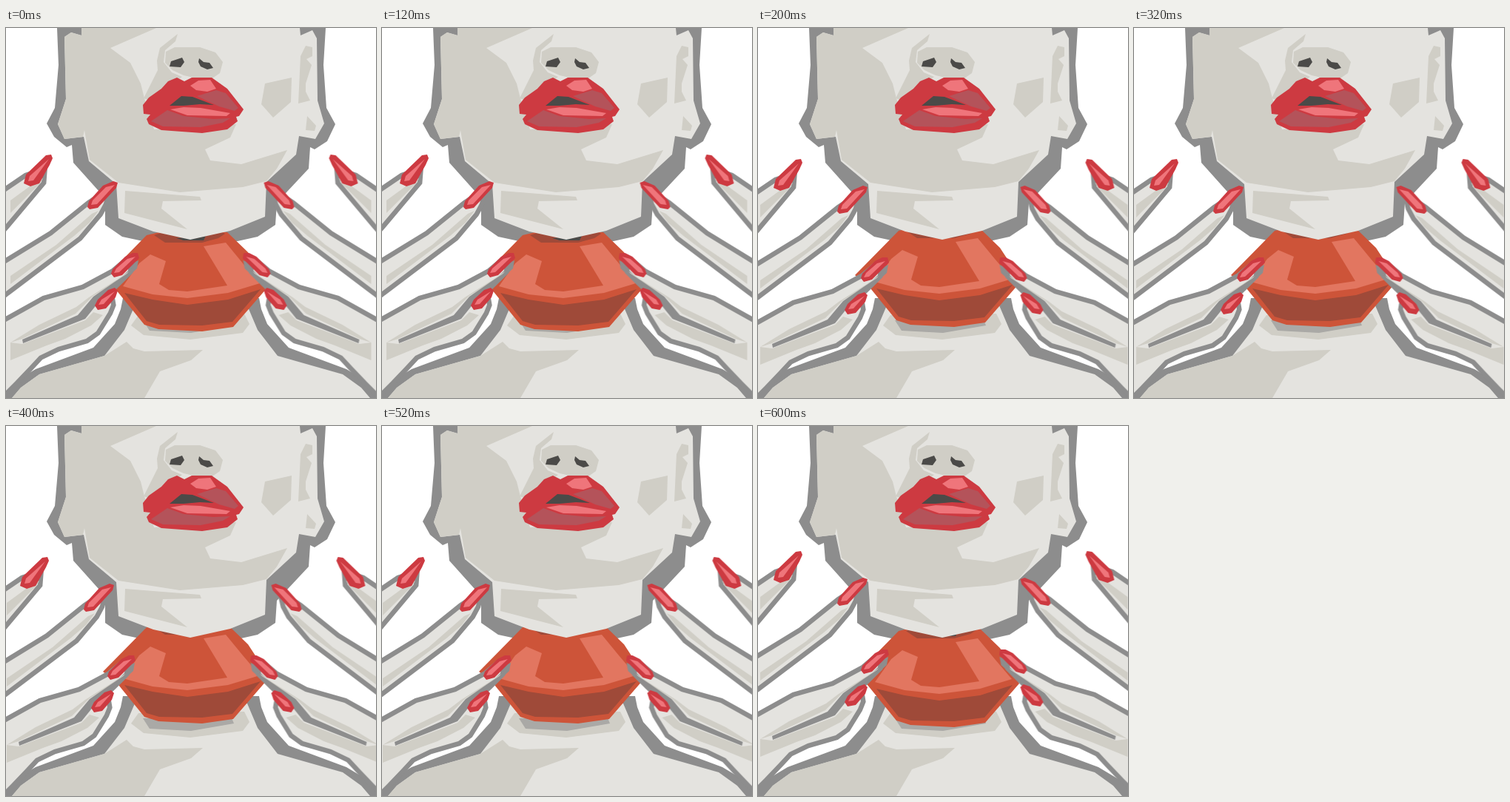
Write an HTML page that moves like this. It is 500 px wide and 500 px high and loops after 800 ms.

```html
<!DOCTYPE html>
<html lang="en">
<head>
<meta charset="utf-8">
<title>Face and hands</title>
<style>
  html, body { margin: 0; width: 100%; height: 100%; overflow: hidden; background: #fff; }
  svg { display: block; width: 100vw; height: 100vh; }
  .line { fill: #8d8d8d; }
  .skin { fill: #e4e3df; }
  .shade { fill: #d0cec6; }
  .dark { fill: #4b4a48; }
  .red { fill: #cd3a41; }
  .pink { fill: #ef757b; }
  .wine { fill: #b4535a; }
  .orange { fill: #cd5439; }
  .peach { fill: #e27660; }
  .rust { fill: #9f4a39; }
  .finger { fill: #e4e3df; stroke: #8d8d8d; stroke-width: 13; paint-order: stroke; stroke-miterlimit: 2; }

  .mouth, .left, .right { animation: 800ms step-end infinite; }
  .mouth { animation-name: mouth; }
  .left { animation-name: left; }
  .right { animation-name: right; }
  @keyframes mouth {
    0% { transform: translate(0, 0); }
    25% { transform: translate(0, -6px); }
    50% { transform: translate(0, -8px); }
    75% { transform: translate(0, -3px); }
  }
  @keyframes left {
    0% { transform: translate(0, 0); }
    25% { transform: translate(-3px, 6px); }
    50% { transform: translate(-5px, 6px); }
    75% { transform: translate(-3px, -2px); }
  }
  @keyframes right {
    0% { transform: translate(0, 0); }
    25% { transform: translate(6px, 6px); }
    50% { transform: translate(10px, 6px); }
    75% { transform: translate(6px, -2px); }
  }
</style>
</head>
<body>
<svg viewBox="0 0 500 500">
  <defs>
    <g id="hand">
      <!-- index -->
      <path class="finger" d="M-20 234L0 221 28 202 49 195 48 208 0 265-20 288Z"/>
      <path class="shade" d="M6 233L32 214 50 203 46 210 6 250Z"/>
      <path class="red" d="M54 172L61 171 63 176 59 185 45 210 33 214 24 210 27 198Z"/>
      <path class="pink" d="M58 177L37 206 30 207 32 200Z"/>
      <!-- middle -->
      <path class="finger" d="M-20 332L0 318 62 280 113 239 135 224 132 237 125 250 98 282 0 356-20 372Z"/>
      <path class="shade" d="M6 335L68 293 116 251 125 247 113 263 92 281 6 346Z"/>
      <path class="red" d="M131 213L145 207 151 209 149 216 124 243 113 245 110 242 112 234Z"/>
      <path class="pink" d="M147 212L123 238 115 239 117 233 135 215Z"/>
      <!-- ring finger, little finger and palm -->
      <path class="finger" d="M-20 408L0 397 52 368 105 353 146 331 166 314 165 328 150 343 128 364 140 362 142 374 138 384 122 410 108 420 70 431 45 443 32 457 12 478-20 510Z"/>
      <path class="shade" d="M6 425L45 401 95 377 112 364 150 340 166 329 160 337 118 362 94 386 22 420ZM6 425L22 427 107 395 118 384 131 388 115 402 80 420 55 429 6 449Z"/>
      <path class="line" d="M179 314L177 325 152 348 128 367 107 393 23 426 22 421 97 388 118 363 147 343 168 329 172 317Z"/>
      <path class="red" d="M161 309L171 304 178 304 180 311 157 334 146 337 142 332 144 326Z"/>
      <path class="pink" d="M175 309L153 330 146 331 149 325 164 312Z"/>
      <path class="red" d="M138 354L147 351 151 355 148 364 135 379 124 381 120 375 124 367Z"/>
      <path class="pink" d="M147 356L132 373 125 374 129 367Z"/>
    </g>
  </defs>

  <rect width="500" height="500" fill="#fff"/>

  <!-- neck and shoulders -->
  <path class="line" d="M158 365L155 380 147 400 118 432 40 461 0 485V500H500V485L460 461 382 432 353 400 345 380 342 365Z"/>
  <path class="skin" d="M174 375L160 408 133 443 45 468 20 486 8 500H492L480 486 455 468 367 443 340 408 326 375Z"/>
  <path class="shade" d="M20 486L45 468 133 443 163 424 172 433 187 437 266 435 250 449 208 464 187 500H8Z"/>
  <path class="shade" d="M179 388L169 402 186 415 249 421 320 412 329 400 322 386Z"/>
  <path fill="#aaa9a6" d="M185 395L194 409 250 412 308 402 304 392Z"/>

  <!-- head outline -->
  <path class="line" d="M69 0L71 50 66 108 55 129 65 147 82 161 89 158 91 182 134 230V266L157 282 185 288H313L340 282 364 266 366 236 409 190 411 161 417 164 434 153 445 130 433 108 429 50 432 0Z"/>

  <g class="mouth">
    <path class="orange" d="M190 280L207 276H299L327 303 346 332 353 351 307 404 265 410 206 407 187 401 148 353 131 340Z"/>
    <path class="rust" d="M200 280L215 275H290L296 278 287 284 265 290 215 290Z"/>
    <path class="dark" d="M230 284L270 281 267 287 240 287Z"/>
    <path class="peach" d="M195 306L216 315 207 346 220 354 245 356 299 348 267 295 297 290 320 318 343 345 300 358 245 365 198 360 158 349 180 318Z"/>
    <path class="rust" d="M160 358L198 367 245 374 300 367 344 353 306 397 265 402 207 401 190 396Z"/>
  </g>

  <!-- face -->
  <path class="skin" d="M102 0V10L88 6 79 12 81 96 70 130 79 150 105 147 112 180 149 211 152 257 199 275 249 286 303 274 350 255 352 208 392 171 396 146 418 150 430 129 421 98 420 14 414 3 398 10 397 0Z"/>
  <path class="shade" d="M102 0V10L88 6 79 12 81 96 70 130 79 150 104 147 106 138 113 178 152 209 235 222 320 215 352 207 366 190 380 165 318 184 276 179 269 164 303 148 311 130 200 137 187 95 182 75 168 47 141 27 203 0Z"/>
  <path class="shade" d="M161 220L262 228 264 233 212 234 210 244 245 272 160 250Z"/>
  <path class="shade" d="M350 75L386 67 385 100 361 121 345 103Z"/>
  <path class="shade" d="M405 24L414 26V38L406 42 413 50 405 75V86L411 98 395 102 398 38ZM407 119L419 132 417 139 405 138Z"/>
  <!-- nose -->
  <path class="shade" d="M232 8L229 18 215 30 213 46 224 60 238 66 225 75 200 100 186 95 205 57 204 44 208 27Z"/>
  <path class="shade" d="M216 32L228 26H262L283 33 293 46 289 61 276 70 258 68 240 64 225 57 215 47Z"/>
  <path class="dark" d="M221 52L223 45 238 40 241 46 236 53ZM261 41L267 46 275 47 280 54 272 56 263 52 260 46Z"/>

  <!-- lips -->
  <path class="red" d="M185 104L193 94 210 82 219 72 231 67 241 72 251 67 278 67 299 82 321 110 315 119 311 120 313 126 299 137 265 142 210 138 193 130 190 123 195 117 186 116Z"/>
  <path class="wine" d="M258 92L284 84 297 88 314 108 309 112 288 106ZM196 126L218 111 240 119 280 123 303 122 293 128 263 134 212 133Z"/>
  <path class="dark" d="M221 105L237 92 252 93 281 104 262 103 240 105Z"/>
  <path class="pink" d="M249 78L260 71 276 70 284 82 272 86 257 84ZM222 110L240 107 263 108 303 115 298 119 245 118Z"/>

  <g class="left"><use href="#hand"/></g>
  <g class="right"><use href="#hand" transform="translate(499.5 0) scale(-1 1)"/></g>
</svg>
</body>
</html>
```
